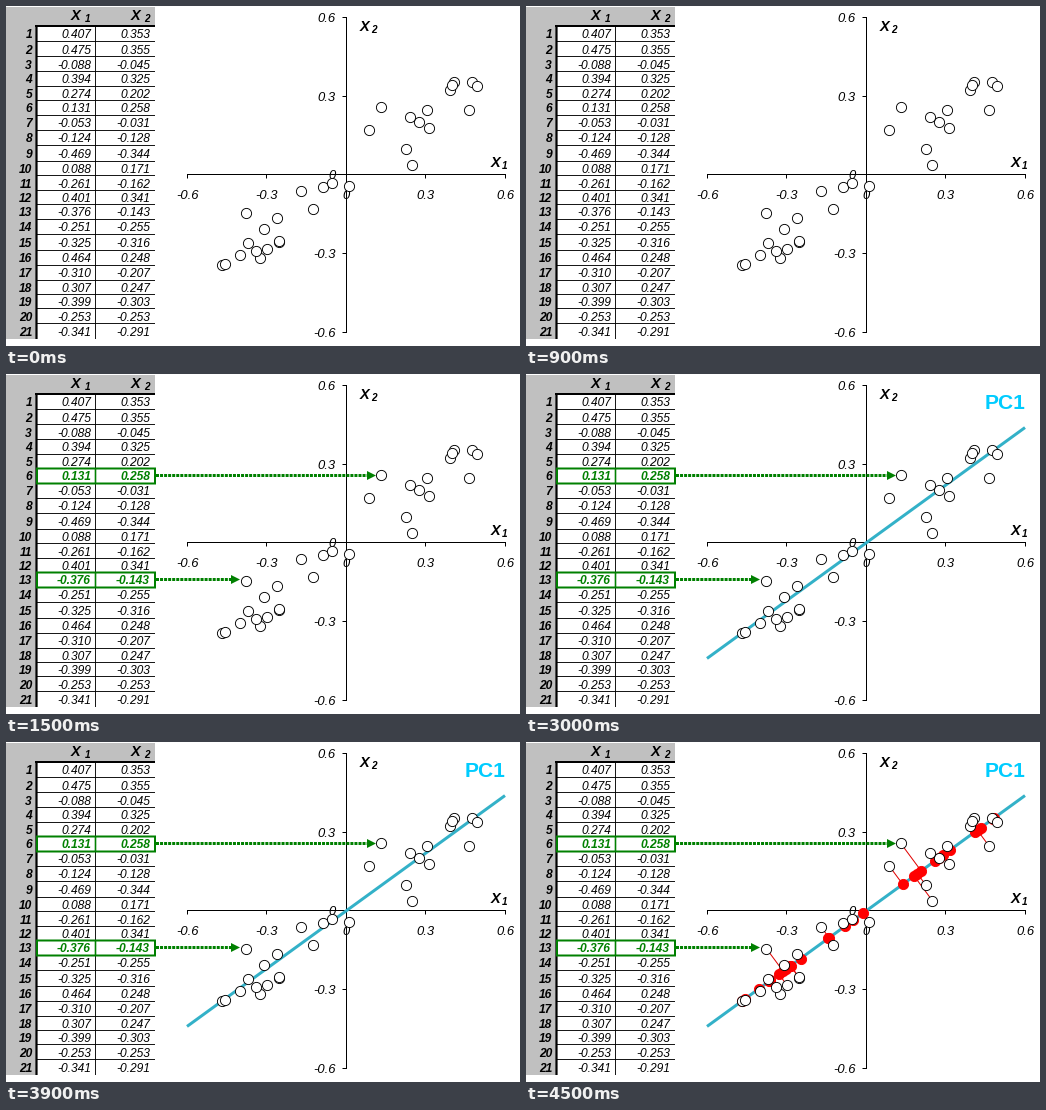
Animation of 514x340 px, one loop 6 s. Source, as a matplotlib script:

```python
import numpy as np
import matplotlib.pyplot as plt
from matplotlib.animation import FuncAnimation
from matplotlib.patches import Polygon, Rectangle

W, H, DPI = 514, 340, 100
PX = 72 / DPI  # points per pixel
GREEN, GREY, CYAN, TEAL = "#008000", "#c0c0c0", "#00ccff", "#33b1c8"
ORIGIN = np.array([340, 169])
SCALE = np.array([265, -262.5])
SLOPE = 0.733

# The values printed in the table, then the points that are only plotted.
TABLE = np.array([
    (.407, .353), (.475, .355), (-.088, -.045), (.394, .325), (.274, .202),
    (.131, .258), (-.053, -.031), (-.124, -.128), (-.469, -.344), (.088, .171),
    (-.261, -.162), (.401, .341), (-.376, -.143), (-.251, -.255),
    (-.325, -.316), (.464, .248), (-.310, -.207), (.307, .247),
    (-.399, -.303), (-.253, -.253), (-.341, -.291)])
UNLISTED = [(.24, .22), (.315, .18), (.225, .1), (.25, .04), (.495, .34),
            (.01, -.04), (-.17, -.06), (-.37, -.26), (-.3, -.28), (-.455, -.34)]
POINTS = np.vstack([TABLE, UNLISTED])
MARKED = {5: 370, 12: 234}  # row index -> arrow tip x

# Evenly spaced rows whose heights waver by less than a pixel.
rows = np.arange(len(TABLE))
ROW_Y = 27.9 + 14.9 * rows + .75 * np.cos(2 * np.pi * (rows - 2) / 6.8)
EDGES = np.floor(np.r_[20, (ROW_Y[:-1] + ROW_Y[1:]) / 2, 332]) + .5

plt.rcParams["font.family"] = "Liberation Sans"
fig = plt.figure(figsize=(W / DPI, H / DPI), dpi=DPI, facecolor="white")
ax = fig.add_axes([0, 0, 1, 1])
ax.set(xlim=(0, W), ylim=(H, 0))
ax.axis("off")


def to_px(points):
    return ORIGIN + np.asarray(points) * SCALE


def line(x, y, color="black", width=1, z=2, **kw):
    kw.setdefault("solid_capstyle", "butt")
    return ax.plot(x, y, color=color, lw=width * PX, zorder=z, snap=False,
                   **kw)[0]


def box(x, y, w, h, z=1, **kw):
    return ax.add_patch(Rectangle((x, y), w, h, zorder=z, snap=False, **kw))


def text(x, y, s, size, ha="left", bold=False, color="black", style="italic"):
    """Place text with its digits centred vertically on y."""
    return ax.text(x, y + .36 * size, s, fontsize=size * PX, ha=ha,
                   va="baseline", color=color, style=style, zorder=3,
                   weight="bold" if bold else "normal")


def variable(x, y, index, gap):
    text(x, y, "X", 14.5, bold=True)
    text(x + 10 + gap, y + 3.5, index, 10, bold=True)


def dots(points, face, edge, z):
    x, y = to_px(points).T
    return line(x, y, z=z, ls="none", marker="o", ms=10.2 * PX, mfc=face,
                mec=edge, mew=.9 * PX)


def draw_table():
    """Draw the table; return the plain and highlighted texts of marked rows."""
    box(0, 1, 149, 19, fc=GREY, lw=0)
    box(0, 1, 30, 332, fc=GREY, lw=0)
    for y in EDGES[1:-1]:
        line([30, 149], [y, y], width=.9)
    line([89.5, 89.5], [20, 333], width=.9)
    line([29, 149], [20, 20], width=2)
    line([30.5, 30.5], [19, 333], width=2.2)
    variable(65, 9, "1", 4)
    variable(125, 9, "2", 3)
    plain, strong = [], []
    for i, (y, row) in enumerate(zip(ROW_Y, TABLE)):
        text(26, y, str(i + 1), 12, "right", bold=True)
        for x, value in zip((85, 144), row):
            label = text(x, y, f"{value:.3f}", 12, "right")
            if i in MARKED:
                plain.append(label)
                strong.append(text(x, y, f"{value:.3f}", 12, "right",
                                   bold=True, color=GREEN))
    return plain, strong


def draw_axes():
    x0, y0 = ORIGIN + (.5, -.5)
    line([181, 500], [y0, y0])
    line([x0, x0], [11, 327])
    for v in (-.6, -.3, 0, .3, .6):
        x, y = to_px((v, v))
        x, y = np.floor(x) + .5, np.ceil(y) - .5
        line([x, x], [y0, y0 + 4])
        line([x0 - 4, x0], [y, y])
        text(x, 188, f"{v:g}", 13, "center")
        text(329.5, y, f"{v:g}", 13, "right")
    variable(485, 155.5, "1", 1)
    variable(354, 19.5, "2", 1)


def draw_highlights():
    parts = []
    for i, tip in MARKED.items():
        top, bottom, y = EDGES[i], EDGES[i + 1], np.floor(ROW_Y[i]) + .5
        parts += [
            box(31, top, 118, bottom - top, 4, fc="none", ec=GREEN, lw=2 * PX),
            line([89.5, 89.5], [top, bottom], GREEN, 1.6, 4),
            line([150, tip - 8], [y, y], GREEN, 3, 4, ls=(0, (1, .35)),
                 dash_capstyle="butt"),
            ax.add_patch(Polygon([(tip, y), (tip - 9, y - 4.5),
                                  (tip - 9, y + 4.5)],
                                 fc=GREEN, lw=0, zorder=4))]
    return parts


def draw_component():
    ends = to_px([(-.6, -.6 * SLOPE), (.6, .6 * SLOPE)])
    return [line(*ends.T, TEAL, 3, 4),
            text(459, 27.5, "PC1", 21, bold=True, color=CYAN, style="normal")]


def draw_projections():
    axis = np.array([1, SLOPE])
    feet = np.outer(POINTS @ axis / (axis @ axis), axis)
    links = [line(*to_px(pair).T, "#e00000", 1, 5)
             for pair in zip(POINTS, feet)]
    return links + [dots(feet, "red", "red", 6)]


plain, strong = draw_table()
draw_axes()
dots(POINTS, "white", "black", 7)
stages = [strong + draw_highlights(), draw_component(), draw_projections()]


def update(step):
    for first, parts in enumerate(stages, 1):
        for part in parts:
            part.set_visible(step >= first)
    for label in plain:
        label.set_visible(step == 0)
    return []


anim = FuncAnimation(fig, update, frames=4, interval=1500, repeat=True,
                     init_func=lambda: update(0))
plt.show()
```
